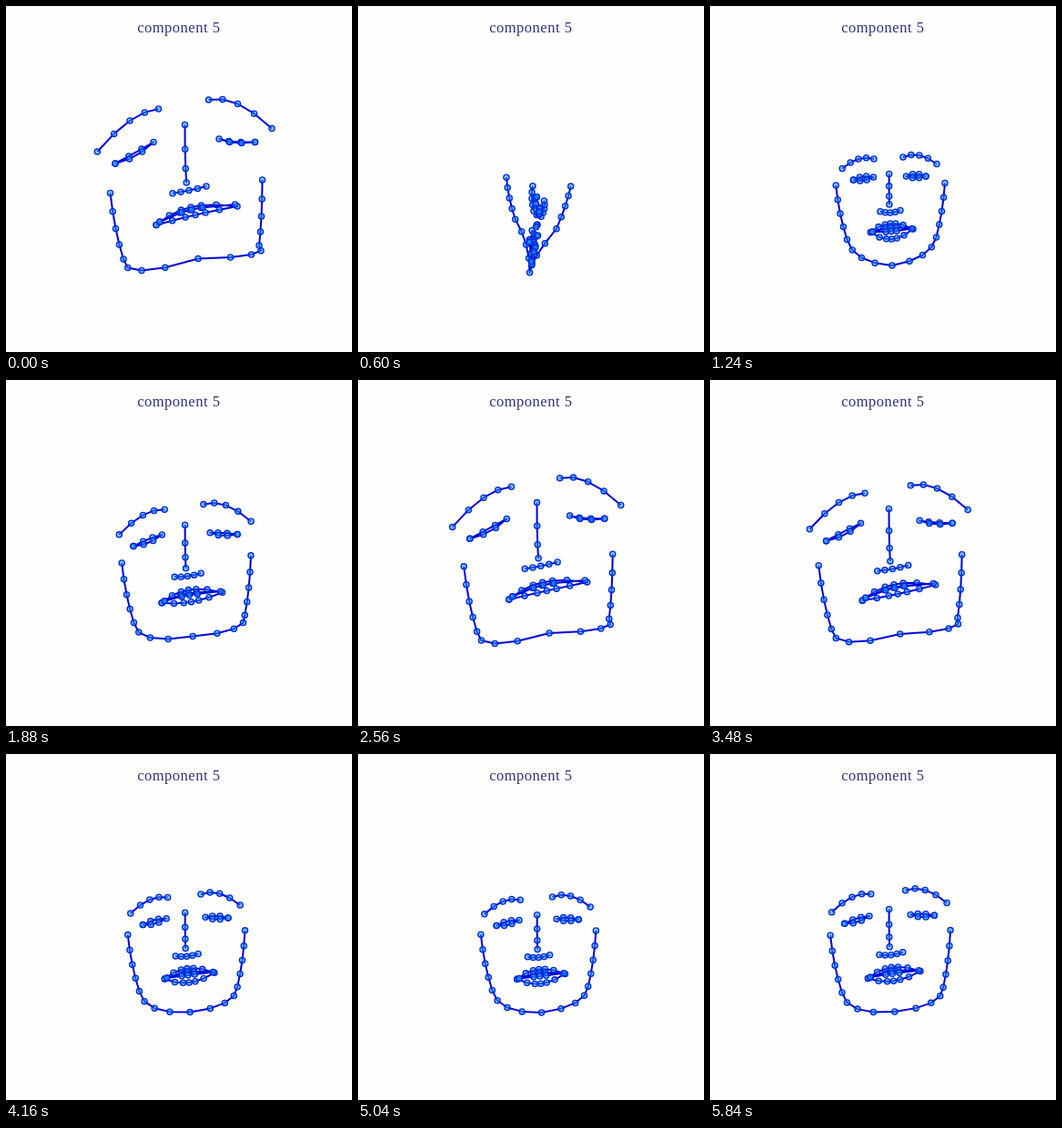
An HTML page with a canvas for the animation above (5880 ms loop, 380x380 px).

```html
<!DOCTYPE html>
<html lang="en">
<head>
<meta charset="utf-8">
<title>component 5</title>
<style>
html, body { margin: 0; width: 100%; height: 100%; overflow: hidden; background: #fefefe; }
canvas { display: block; }
</style>
</head>
<body>
<canvas id="stage" width="380" height="380"></canvas>
<script>
const ctx = document.getElementById('stage').getContext('2d');
const LOOP = 5880, STEP = 40;

// A feature is a chain of parabolic arcs. Each key is [x, y] at weight 0, then [x, y] at weight 1.
// steps: markers per arc; bunch: how far markers crowd towards the middle of an arc.
const feature = (steps, bunch, ...keys) => ({ steps, bunch, keys });

const eye = (outer, top, inner, bottom) => feature(3, 0, outer, top, inner, bottom, outer);
const lips = (steps, bunch, left, top, right, bottom) => feature(steps, bunch, left, top, right, bottom, left);

const face = [
  // jaw
  feature(4, 0,
    [138.3, 197, 114.5, 205.5], [143, 228, 120.5, 244.5], [150.5, 256.5, 129, 278],
    [166.5, 276.5, 149, 290.5], [200, 285, 211, 277.5], [233.5, 273.5, 269.5, 273],
    [248.5, 254, 278, 263], [254.5, 225.5, 280.5, 231], [258, 194.5, 281.5, 191]),
  // brows
  feature(4, 0, [145.3, 178.5, 100.3, 160], [163, 168, 136, 126], [180, 168, 167.5, 113]),
  feature(4, 0, [212, 166, 222.5, 103], [230, 164, 254.5, 107.5], [249, 173.5, 292, 134.5]),
  // nose
  feature(3, 0, [196.7, 184.5, 196.5, 130.5], [196.7, 203.7, 196.9, 168.5], [196.9, 218, 198.2, 194]),
  feature(4, 0, [187, 225.7, 183, 205.7], [198, 227, 201, 202.5], [209, 224.5, 220, 198]),
  eye([157.5, 191, 120, 173], [168, 187.2, 142, 161], [179.5, 188, 162, 149.5], [168.5, 191.7, 142.7, 164.3]),
  eye([237, 187, 273.5, 149.5], [226, 184.5, 251, 149.2], [215.5, 187, 234, 146], [226, 189, 252, 150.3]),
  lips(6, .05, [176.5, 248.5, 165, 240.5], [198, 239, 203, 221], [223, 245, 254, 220], [199.5, 256, 208, 229.5]),
  lips(4, .11, [178.5, 248, 169, 237], [198.5, 243.5, 202, 224], [221.5, 244.5, 251.5, 218], [199, 247.5, 204, 223.5])
];

// Turning points of the component weight: [ms, weight].
const swing = [[0, 1], [420, -1.2], [1000, .1], [1240, 0], [1600, .65], [2140, .3], [2560, .924],
  [2860, 1.14], [3480, .796], [4160, .19], [4420, .45], [4780, -.35], [5040, .143], [5260, .33], [5840, .258]];

function slope(i) {
  const a = swing[Math.max(i - 1, 0)], b = swing[Math.min(i + 1, swing.length - 1)];
  return (b[1] - a[1]) / (b[0] - a[0]);
}

// Cubic Hermite curve through the turning points.
function weight(t) {
  let i = 0;
  while (i < swing.length - 2 && t >= swing[i + 1][0]) i++;
  const [t0, w0] = swing[i], [t1, w1] = swing[i + 1];
  const d = t1 - t0, u = (t - t0) / d, v = 1 - u;
  return w0 * (1 + 2 * u) * v * v + w1 * u * u * (3 - 2 * u)
    + d * u * v * (slope(i) * v - slope(i + 1) * u);
}

// Parabola that passes through a, b and c at u = 0, 1/2 and 1.
const parabola = (a, b, c, u) => [0, 1].map(k =>
  a[k] * (1 - u) * (1 - 2 * u) + b[k] * 4 * u * (1 - u) + c[k] * u * (2 * u - 1));

function pose({ steps, bunch, keys }, w) {
  const at = keys.map(([x, y, fx, fy]) => [x + w * (fx - x), y + w * (fy - y)]);
  const points = [at[0]];
  for (let k = 0; k + 2 < at.length; k += 2) {
    for (let i = 1; i <= steps; i++) {
      const u = i / steps;
      points.push(parabola(at[k], at[k + 1], at[k + 2], u + bunch * Math.sin(2 * Math.PI * u)));
    }
  }
  return points;
}

function drawFeature(points) {
  ctx.strokeStyle = '#0000dc';
  ctx.lineWidth = 2;
  ctx.beginPath();
  points.forEach(p => ctx.lineTo(...p));
  ctx.stroke();

  ctx.strokeStyle = '#0028d8';
  ctx.lineWidth = 1.3;
  for (const [x, y] of points) {
    ctx.beginPath();
    ctx.arc(x, y, 3.1, 0, 2 * Math.PI);
    ctx.fill();
    ctx.stroke();
  }
}

function draw(t) {
  ctx.fillStyle = '#fefefe';
  ctx.fillRect(0, 0, 380, 380);

  ctx.fillStyle = '#30307a';
  ctx.font = '16.5px "Liberation Serif", serif';
  ctx.letterSpacing = '0.5px';
  ctx.textAlign = 'center';
  ctx.fillText('component 5', 189.8, 28.7);

  ctx.lineJoin = 'round';
  ctx.fillStyle = 'rgba(30, 150, 255, 0.55)';
  const w = weight(t);
  face.forEach(f => drawFeature(pose(f, w)));
}

const start = performance.now();
function tick() {
  const t = (performance.now() - start) % LOOP;
  draw(Math.floor(t / STEP) * STEP);
  requestAnimationFrame(tick);
}
tick();
</script>
</body>
</html>
```
